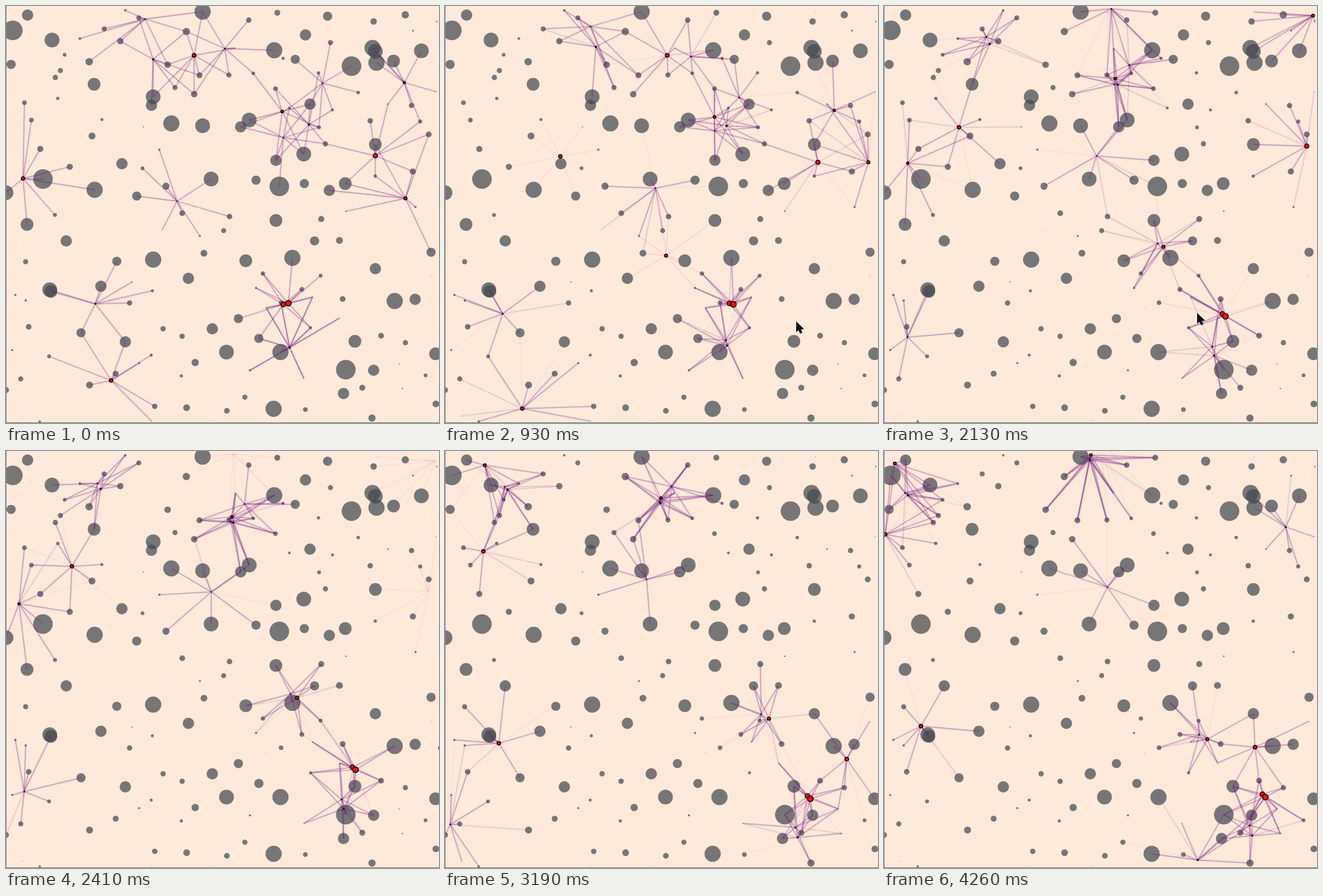
Animation of 762 by 735 pixels, one loop 4.36 s. Source, as an HTML page with a canvas:

```html
<!DOCTYPE html>
<html lang="en">
<head>
<meta charset="utf-8">
<title>Crawlers</title>
<style>
html, body { margin: 0; width: 100%; height: 100%; overflow: hidden; background: #ffe9da; }
canvas { display: block; }
</style>
</head>
<body>
<canvas id="stage" width="762" height="735"></canvas>
<script>
const W = 762, H = 735, LOOP = 4360, STEP = 132.5, END = 32;
const LEGS = 9, REACH = 140, SMALL = 112;
const ctx = document.getElementById('stage').getContext('2d');

const pairs = list => list.flatMap((x, i) => i % 2 ? [] : [[x, list[i + 1]]]);

// Large dots: radius, then x and y of each
const large = [
  [17.3, 12,43, 65,305, 481,318, 608,106, 598,641],
  [14.3, 346,10, 291,207, 472,78, 652,100, 645,74, 156,324, 483,610, 471,710, 259,447, 504,444, 684,520],
  [13, 81,60, 259,160, 346,211, 650,80, 731,79, 428,201, 0,329, 361,305, 524,261, 77,500, 388,610],
  [11.2, 650,244, 475,378, 37,385, 155,138, 682,97, 597,313, 79,503, 422,449, 756,613, 614,591],
  [10, 527,51, 256,175, 535,173, 413,213, 569,325, 106,414, 210,592, 363,569, 647,642, 594,683, 720,517,
    650,463, 38,16, 204,278, 475,272, 321,480, 167,494],
  [8.1, 566,18, 9,103, 230,335, 525,313, 543,414, 132,576, 195,450, 409,551, 445,586, 509,94, 440,307, 748,434]
];
const dots = large.flatMap(([r, ...list]) => pairs(list).map(([x, y]) => ({ x, y, r })));

// Small dots: seeded, each at the roomiest of a few spots
let seed = 7;
const rand = () => (seed = seed * 16807 % 2147483647) / 2147483647;
const room = p => Math.min(...dots.map(d => Math.hypot(d.x - p.x, d.y - p.y) - d.r));
for (let i = 0; i < SMALL; i++) {
  const spots = Array.from({ length: 4 }, () => ({ x: rand() * W, y: rand() * H }));
  const best = spots.reduce((a, b) => room(b) > room(a) ? b : a);
  dots.push({ ...best, r: 0.5 + 6.1 * rand() ** 0.9 });
}

// Lone crawlers: radius, first and last step, evenly timed points
const loners = [
  [3, 0, 7, 30,304, -40,300],
  [3, 7, 32, 203,265, 104,196, 2,147],
  [1, 0, 32, 301,344, 392,305, 350,230, 393,240],
  [1.4, 0, 28, 157,525, 52,570, -6,697],
  [3, 0, 12, 185,660, 101,745],
  [3.3, 0, 14, 331,87, 391,87, 394,10],
  [1.3, 0, 16, 385,75, 435,86, 400,5],
  [3.7, 0, 16, 650,264, 661,275, 744,247],
  [2.7, 0, 12, 703,339, 775,230],
  [2, 0, 12, 701,135, 680,180, 737,193],
  [2.5, 10, 16, 697,3, 755,17],
  [2, 14, 28, 60,285, 2,257, 1,225],
  [2.5, 19, 32, 102,27, 19,22],
  [3.1, 19, 32, 148,475, 83,520, 65,485],
  [3.3, 16, 32, 785,515, 707,543, 653,522],
  [1.8, 19, 32, 505,728, 530,745, 552,721],
  [1.6, 26, 32, 775,123, 707,134]
];

// Herds: a leader like above, and followers with radius, first and last offset
const herds = [
  { lead: [2.3, 0, 32, 486,186, 470,193, 407,128, 380,83, 364,7],
    tail: [[1.9, 47,23, -2,9], [1.2, 2,46, -2,5], [1.2, 71,-50, 18,-20]] },
  { lead: [5, 0, 32, 497,524, 513,527, 601,547, 643,613, 671,610],
    tail: [[4.1, -9,2, -5,-5], [1.5, 2,78, -27,50], [1.8, 2,78, -23,68]] },
  { lead: [1.9, 0, 32, 259,94, 262,70, 186,67, 110,68, 42,78],
    tail: [[1.3, -14,-71, -5,-4]] },
  { lead: [2.7, 7, 32, 389,440, 462,417, 527,443, 580,482, 569,508],
    tail: [[1.3, 0,0, -14,-8]] }
];

const path = ([r, from, to, ...list]) => ({ r, from, to, pts: pairs(list), shift: () => [0, 0] });
const follow = lead => ([r, ax, ay, bx, by]) => ({
  ...lead, r,
  shift(u) {
    const w = (1 - u) ** 3;
    return [bx + (ax - bx) * w, by + (ay - by) * w];
  }
});
const crawlers = [
  ...loners.map(path),
  ...herds.flatMap(({ lead, tail }) => [...tail.map(follow(path(lead))), path(lead)])
];
const pointer = path([0, 7, 16, 618,556, 534,578, 551,541]);

// Smooth curve through evenly timed points
function place({ from, to, pts, shift }, t) {
  const u = Math.min(Math.max((t - from) / (to - from), 0), 1);
  const last = pts.length - 1, i = Math.min(Math.floor(u * last), last - 1), v = u * last - i;
  const offset = shift(u);
  return [0, 1].map(a => {
    const p1 = pts[i][a], p2 = pts[i + 1][a];
    const p0 = i ? pts[i - 1][a] : 2 * p1 - p2;
    const p3 = i + 2 <= last ? pts[i + 2][a] : 2 * p2 - p1;
    const m1 = (p2 - p0) / 2, m2 = (p3 - p1) / 2, d = p2 - p1;
    return p1 + v * (m1 + v * (3 * d - 2 * m1 - m2 + v * (m1 + m2 - 2 * d))) + offset[a];
  });
}

const alive = (c, t) => t >= c.from && t <= c.to;
const onStage = ([x, y]) => x >= 0 && x <= W && y >= -1 && y <= H;

// The nearest dots within reach
function grip(c, t) {
  const at = place(c, t);
  if (!alive(c, t) || !onStage(at)) return [];
  return dots
    .map(dot => ({ dot, d: Math.hypot(dot.x - at[0], dot.y - at[1]) }))
    .filter(o => o.d < REACH)
    .sort((a, b) => a.d - b.d)
    .slice(0, LEGS)
    .map(o => o.dot);
}

function disc(x, y, r) {
  ctx.beginPath();
  ctx.arc(x, y, r, 0, 7);
  ctx.fill();
}

// Legs fade over three steps as their hold comes and goes
function drawLegs(c, t) {
  const [x, y] = place(c, t);
  const hold = new Map();
  for (let k = 0; k < 3; k++)
    for (const dot of grip(c, Math.max(t - k, 0))) hold.set(dot, (hold.get(dot) || 0) + 1 / 3);
  for (const [dot, w] of hold) {
    ctx.beginPath();
    ctx.moveTo(x, y);
    ctx.lineTo(dot.x, dot.y);
    for (const [width, alpha] of [[4, 0.07], [1.3, 0.38]]) {
      ctx.lineWidth = width;
      ctx.strokeStyle = `rgba(110,30,130,${alpha * w * w})`;
      ctx.stroke();
    }
  }
}

function drawBody(c, t) {
  if (!alive(c, t)) return;
  const [x, y] = place(c, t);
  ctx.fillStyle = c.r < 2 ? '#100010' : '#fa1010';
  disc(x, y, c.r);
  if (c.r < 2) return;
  ctx.lineWidth = 1.6;
  ctx.strokeStyle = '#000';
  ctx.stroke();
}

function drawPointer(t) {
  if (!alive(pointer, t)) return;
  ctx.save();
  ctx.translate(...place(pointer, t));
  ctx.fillStyle = '#06131a';
  ctx.fill(new Path2D('M0 0V19L4 15.5L7 21.5L11 20L8.5 14L14 13.5Z'));
  ctx.restore();
}

function draw(t) {
  ctx.fillStyle = '#ffe9da';
  ctx.fillRect(0, 0, W, H);
  ctx.fillStyle = 'rgba(67,74,81,.72)';
  for (const { x, y, r } of dots) disc(x, y, r);
  for (const c of crawlers) drawLegs(c, t);
  for (const c of crawlers) drawBody(c, t);
  drawPointer(t);
  ctx.fillStyle = '#8a8482';
  ctx.fillRect(0, 0, 1, H);
  ctx.fillStyle = '#6a6664';
  ctx.fillRect(0, H - 1, W, 1);
}

const begin = performance.now();
let shown = -1;
function tick() {
  const ms = (performance.now() - begin) % LOOP;
  const step = Math.min(Math.floor(ms / STEP), END);
  if (step !== shown) draw(shown = step);
  requestAnimationFrame(tick);
}
tick();
</script>
</body>
</html>
```
